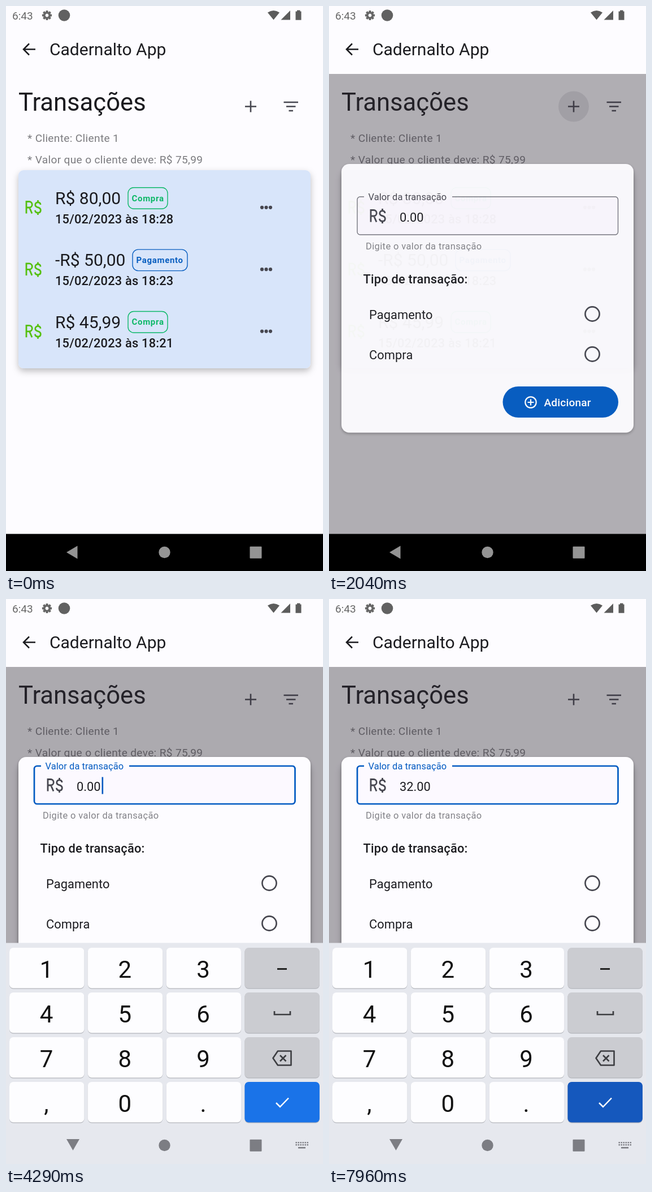
Write an HTML page that moves like this. It is 561 px wide and 998 px high and loops after 8000 ms.

```html
<!DOCTYPE html>
<html lang="pt-BR">
<head>
<meta charset="utf-8">
<title>Transações</title>
<style>
html, body { margin: 0; width: 100%; height: 100%; overflow: hidden; background: #fdfcff; }
svg { display: block; width: 100%; height: 100%; }
text { font-family: Roboto, sans-serif; white-space: pre; }
</style>
</head>
<body>
<svg id="stage" viewBox="0 0 561 998" xmlns="http://www.w3.org/2000/svg"></svg>
<script>
const LOOP = 8000;
const BLUE = '#005ac1', GREEN = '#0db868', INK = '#1b1b1f', ICON = '#46464f';
const PRESS_ADD = 1720, MODAL_IN = 1900, FOCUS = 2930, KEYBOARD_IN = 2980;
const CONFIRM = 7890, SCROLL = 42;
const typed = [
  { at: 4850, key: '3', value: '0.03' },
  { at: 5450, key: '2', value: '0.32' },
  { at: 6400, key: '0', value: '3.20' },
  { at: 7200, key: '0', value: '32.00' }
];

const text = (x, y, s, size, fill = INK, extra = '') =>
  `<text x="${x}" y="${y}" font-size="${size}" fill="${fill}" ${extra}>${s}</text>`;
const rect = (x, y, w, h, r, fill, extra = '') =>
  `<rect x="${x}" y="${y}" width="${w}" height="${h}" rx="${r}" fill="${fill}" ${extra}/>`;
const circle = (x, y, r, fill, extra = '') =>
  `<circle cx="${x}" cy="${y}" r="${r}" fill="${fill}" ${extra}/>`;
const line = (d, color, width, extra = '') =>
  `<path d="${d}" fill="none" stroke="${color}" stroke-width="${width}" ${extra}/>`;
const shape = (d, fill) => `<path d="${d}" fill="${fill}"/>`;
const spaced = (n, weight = 400) => `letter-spacing="${n}" font-weight="${weight}"`;

const realIcon = (x, y, color) => line(
  'M1.5 24V3H6.5a5.2 5.2 0 0 1 0 10.5H1.5M7 13.5L11.5 24' +
  'M26.5 8.5C26.5 5.5 24.5 4.3 22 4.3S17.3 5.8 17.3 8.7C17.3 12 20 12.6 22 13.2' +
  'S26.8 15 26.8 18.2S24.6 22.7 22 22.7S17 21.4 17 18.3M22 .5V4.3M22 22.7V26.5',
  color, 2.8, `transform="translate(${x} ${y})"`);

function gear(x, y) {
  let teeth = '';
  for (let a = 0; a < 360; a += 45)
    teeth += rect(-2, -8.6, 4, 5, 0.8, '#666', `transform="rotate(${a})"`);
  return `<g transform="translate(${x} ${y})">${teeth}${circle(0, 0, 4.7, 'none', 'stroke="#666" stroke-width="3.6"')}</g>`;
}

const statusBar = () =>
  text(11, 23.5, '6:43', 19, '#666') + gear(72.5, 16.5) + circle(103, 16.5, 10.3, '#616161') +
  shape('M463 11.5Q473.500 4.500 484 11.500L473.500 24.500Z', '#5c5c5c') +
  shape('M503 8V24.500H486.500Z', '#5c5c5c') +
  shape('M515 7.500H520.500V9.500H522.500V24.800H512.500V9.500H515Z', '#5c5c5c');

const header = () =>
  rect(0, 0, 561, 120, 0, '#fdfcff') + statusBar() +
  line('M52 76.500H32M41 66.500L31 76.500L41 86.500', INK, 2.5) +
  text(77, 87, 'Cadernalto App', 30);

function row(i, value, date, kind) {
  const y = i * 109.4, buy = kind === 'Compra';
  const color = buy ? GREEN : '#0a5fc0', x = buy ? 216 : 224;
  return `<g transform="translate(0 ${y})">` +
    realIcon(34.5, 342.5, '#55c00f') +
    text(87, 350, value, 30) +
    rect(x, 320.700, buy ? 70 : 97, 37.500, 10, 'none', `stroke="${color}" stroke-width="1.4"`) +
    text(x + 6.5, 344.500, kind, 15, color, spaced(0.68, 700)) +
    text(87, 384, date, 21.8, INK, spaced(0.2, 500)) +
    [453, 460.500, 468].map(cx => circle(cx, 355.800, 3.1, ICON)).join('') + '</g>';
}

const page = () =>
  rect(0, 0, 561, 998, 0, '#fdfcff') +
  text(22, 185, 'Transações', 43.6) +
  circle(433, 177.5, 27, ICON, 'id="ripple"') +
  line('M423 177.500H443M433 167.500V187.500', ICON, 2.6) +
  line('M491.500 170H517M496 177.500H512.500M500.500 185H508', ICON, 2.6) +
  text(38, 240, '* Cliente: Cliente 1', 19.1, '#7b7b7f', spaced(0.34)) +
  text(38, 278, '* Valor que o cliente deve: R$ 75,99', 19.1, '#7b7b7f', spaced(0.34)) +
  rect(22, 290, 517, 350, 9, '#d8e5fa', 'filter="url(#cardShadow)"') +
  row(0, 'R$ 80,00', '15/02/2023 às 18:28', 'Compra') +
  row(1, '-R$ 50,00', '15/02/2023 às 18:23', 'Pagamento') +
  row(2, 'R$ 45,99', '15/02/2023 às 18:21', 'Compra');

const radio = y => circle(466, y, 12.600, 'none', `stroke="${ICON}" stroke-width="2.7"`);

const modal = () =>
  rect(22, 279, 517, 474.500, 14, '#fdfcff', 'filter="url(#modalShadow)"') +
  '<g clip-path="url(#modalClip)"><g id="form">' +
  rect(50, 337, 461.500, 67, 5, '#fcf9ff', 'id="field"') +
  rect(62, 333, 156, 8, 0, '#fdfbff') +
  text(69.500, 343, 'Valor da transação', 16.4, ICON, 'id="label" letter-spacing="0.1"') +
  realIcon(72.500, 357.500, ICON) +
  text(125, 380.500, '0.00', 21.8, INK, 'id="value"') +
  rect(169.500, 356.500, 2.6, 30, 0, BLUE, 'id="caret"') +
  text(65, 430, 'Digite o valor da transação', 16.4, '#828287', spaced(0.42)) +
  text(60.500, 490, 'Tipo de transação:', 21.8, INK, spaced(0.2, 500)) +
  text(71, 553, 'Pagamento', 21.8, INK, spaced(0.1)) + radio(544) +
  text(71, 624, 'Compra', 21.8, INK, spaced(0.1)) + radio(615) +
  rect(307.500, 672, 204.500, 55, 27.500, BLUE) +
  circle(357, 700, 9.700, 'none', 'stroke="#fff" stroke-width="2.2"') +
  line('M351.500 700H362.500M357 694.500V705.500', '#fff', 2.2) +
  text(380.500, 707, 'Adicionar', 19.1, '#fff', spaced(0.14, 500)) +
  '</g></g>';

const navBar = () =>
  rect(0, 932.500, 561, 66, 0, '#000') +
  shape('M107 965L126.500 953.500V976.500Z', '#949494') +
  circle(280.500, 965, 10.2, '#949494') + rect(431.500, 954.700, 21, 21, 1, '#949494');

function keyboard() {
  const keys = ['1', '2', '3', '-', '4', '5', '6', '_', '7', '8', '9', '<', ',', '0', '.', 'ok'];
  let out = rect(0, 607.500, 561, 391, 0, '#e6e8ee');
  keys.forEach((k, i) => {
    const col = i % 4, line4 = Math.floor(i / 4);
    const x = 6 + col * 138.8, y = 616 + line4 * 79;
    const fill = k === 'ok' ? '#1a73e8' : col === 3 ? '#cbccd1' : '#fdfdff';
    out += rect(x, y + 1.3, 132.500, 71.500, 7, '#b4b6bc') +
      rect(x, y, 132.500, 71.500, 7, fill, `data-key="${k}" data-fill="${fill}"`);
    if (col < 3) out += text(x + 65.500, y + 52.5, k, 42, '#111', 'text-anchor="middle"');
  });
  out += line('M480 653.500H497', '#222', 3) +
    line('M475 728V734H503V728', '#3c3d41', 2.7) +
    line('M481 798.500H504.500V823.500H481L472.500 811Z', '#3c3d41', 2.6, 'stroke-linejoin="round"') +
    line('M485 806L495.500 816.500M495.500 806L485 816.500', '#3c3d41', 2.6) +
    line('M478 890L485 897L500 881.500', '#fff', 2.5) +
    shape('M107 954H130L118.500 974Z', '#7c7d83') +
    circle(280.500, 965, 10.2, '#7c7d83') + rect(431.500, 954.700, 21, 21, 1, '#7c7d83');
  for (let r = 0; r < 2; r++)
    for (let c = 0; c < 6; c++) out += rect(512.500 + c * 4, 959 + r * 4, 2.4, 2.4, 0, '#7c7d83');
  return out + rect(517, 968, 13, 2.5, 0, '#7c7d83');
}

const shadow = (id, dy, blur, opacity) =>
  `<filter id="${id}" x="-10%" y="-10%" width="120%" height="125%">
   <feDropShadow dx="0" dy="${dy}" stdDeviation="${blur}" flood-color="#000" flood-opacity="${opacity}"/></filter>`;

document.getElementById('stage').innerHTML =
  `<defs>${shadow('cardShadow', 5, 6, 0.25)}${shadow('modalShadow', 2, 2.5, 0.3)}
   <clipPath id="modalClip">${rect(22, 279, 517, 474.500, 14, '#000')}</clipPath></defs>` +
  page() + rect(0, 120, 561, 813, 0, 'rgb(50,47,55)', 'id="dim"') + header() +
  `<g id="modal">${modal()}</g>` + navBar() + `<g id="keyboard">${keyboard()}</g>`;

const el = id => document.getElementById(id);
const ui = Object.fromEntries(
  ['ripple', 'dim', 'modal', 'form', 'field', 'label', 'value', 'caret', 'keyboard'].map(id => [id, el(id)]));
const keyRects = [...document.querySelectorAll('[data-key]')];
const progress = (t, from, span) => Math.min(1, Math.max(0, (t - from) / span));
const easeOut = p => 1 - (1 - p) ** 3;
const set = (node, attrs) => {
  for (const name in attrs) node.setAttribute(name, attrs[name]);
};

function draw(t) {
  const shown = easeOut(progress(t, MODAL_IN, 220));
  set(ui.ripple, { opacity: 0.13 * progress(t, PRESS_ADD, 80) * (1 - progress(t, 2080, 180)) });
  set(ui.dim, { opacity: 0.4 * shown });
  set(ui.modal, { opacity: shown });

  const focused = t >= FOCUS;
  const up = easeOut(progress(t, KEYBOARD_IN, 270));
  set(ui.field, { stroke: focused ? BLUE : '#74747c', 'stroke-width': focused ? 2.7 : 1.4 });
  set(ui.label, { fill: focused ? BLUE : ICON });
  set(ui.form, { transform: `translate(0 ${-SCROLL * up})` });
  set(ui.keyboard, { transform: `translate(0 ${391 * (1 - up)})`, visibility: up > 0 ? 'visible' : 'hidden' });

  const last = typed.filter(s => t >= s.at).pop();
  const value = last ? last.value : '0.00';
  if (ui.value.textContent !== value) ui.value.textContent = value;
  const blink = (t - (last ? last.at : FOCUS)) % 1000 < 500;
  set(ui.caret, {
    x: value.length > 4 ? 181.700 : 169.500,
    visibility: focused && blink ? 'visible' : 'hidden'
  });

  for (const key of keyRects) {
    const { key: name, fill } = key.dataset;
    const pressed = typed.some(s => s.key === name && t >= s.at - 60 && t < s.at + 60);
    const color = name === 'ok' && t >= CONFIRM ? '#1558bd' : pressed ? '#d9dae0' : fill;
    set(key, { fill: color });
  }
}

const start = performance.now();
function tick() {
  draw((performance.now() - start) % LOOP);
  requestAnimationFrame(tick);
}
tick();
</script>
</body>
</html>
```
